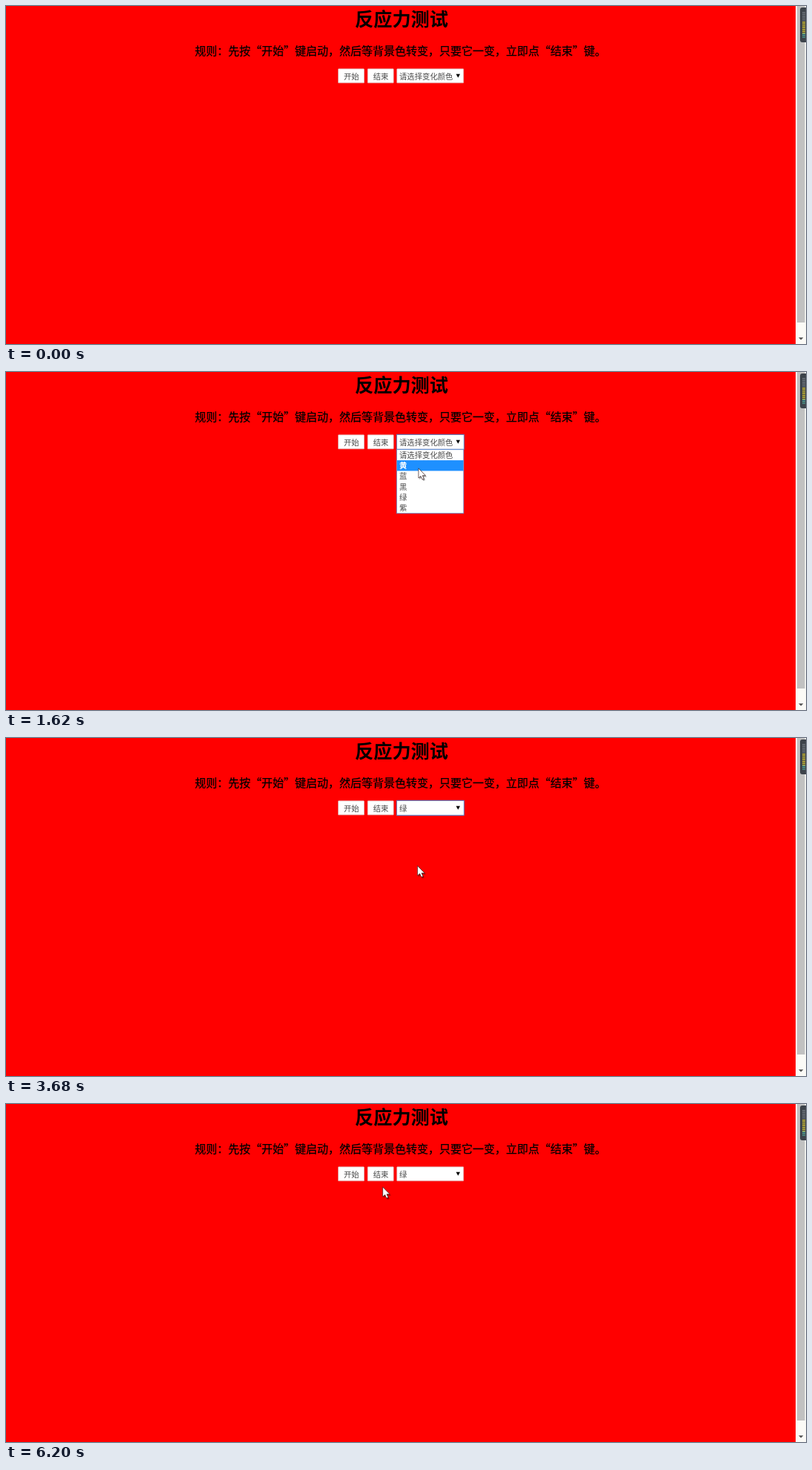
An HTML page that plays this animation: 1080x456 px, repeating every 8 s.

```html
<!DOCTYPE html>
<html lang="zh-CN">
<head>
<meta charset="utf-8">
<title>反应力测试</title>
<style>
  html, body { margin: 0; width: 100%; height: 100%; overflow: hidden; background: #f00; }
  svg { display: block; width: 100vw; height: 100vh; }
  text { font-family: "Noto Sans CJK SC", "Noto Sans CJK", sans-serif; white-space: pre; }
  .control rect { fill: #fff; stroke: #d8a8a8; stroke-width: .7; }
  .control.hover rect { stroke: #b89090; }
  .control.focus rect { x: 527.4px; y: 84.4px; width: 91px; height: 20px; stroke: #6678b8; stroke-width: 1.1; }
  .rule { font-size: 15px; font-weight: 500; stroke: #000; stroke-width: .25; }
  .small { font-size: 10.35px; fill: #484848; }
  .active { fill: #fff; font-weight: 700; }
</style>
</head>
<body>
<svg viewBox="0 0 1080 456" preserveAspectRatio="none">
  <rect width="1080" height="456" fill="#f00"/>
  <text x="471" y="27" font-size="25.2" font-weight="700">反应力测试</text>
  <text class="rule" x="255" y="66.3">规则：先按“开始”键启动，然后等背景色转变，只要它一变，立即点“结束”键。</text>

  <g class="control" id="start">
    <rect x="448.5" y="84.8" width="35" height="19" rx=".6"/>
    <text class="small" x="456" y="98.6">开始</text>
  </g>
  <g class="control" id="stop">
    <rect x="488.2" y="84.8" width="35" height="19" rx=".6"/>
    <text class="small" x="495.7" y="98.6">结束</text>
  </g>
  <g class="control" id="select">
    <rect x="527.7" y="84.8" width="90" height="19" rx=".6"/>
    <text class="small" id="value" x="531" y="98.6"></text>
    <path d="M607.6 91.8H613L610.3 96.8Z"/>
  </g>

  <g id="menu">
    <rect x="527.5" y="104.7" width="90.3" height="86" fill="#fff" stroke="#5b8fd8" stroke-width=".8"/>
    <rect id="mark" x="528" width="89.5" height="14.3" fill="#1e90ff"/>
    <g id="rows"></g>
  </g>

  <rect x="1066" width="14" height="456" fill="#fbfaf6"/>
  <rect x="1068" width="10.5" height="427" fill="#c1c1c1"/>
  <path d="M1070 447.3H1076.4L1073.2 450.5Z" fill="#505050"/>
  <rect x="1072" y="2" width="14" height="47" rx="3" fill="#3d434b"/>
  <g stroke-width="4" stroke-dasharray="1.4 1.1">
    <path d="M1077 8V20" stroke="#6c737b"/>
    <path d="M1077 21V37" stroke="#c6b52f"/>
    <path d="M1077 37V43" stroke="#4f9e91"/>
  </g>

  <g id="cursor">
    <path d="M1.6 1.5V15.6L4.7 12.8L6.9 17.4L9.4 16.3L7.3 11.9H11.6Z" opacity=".38"/>
    <path d="M.4 .4V13.6L3.4 10.9L5.5 15.6L7.8 14.6L5.8 10.2H9.9Z" fill="#fff" stroke="#3a2020" stroke-width=".7"/>
  </g>
</svg>
<script>
const LOOP = 8000, STEP = 60;
const OPEN = 1250, CHOOSE = 3680, BLUR = 4120;
const ROW_TOP = 104.8, ROW_HEIGHT = 14.3;
const options = ["请选择变化颜色", "黄", "蓝", "黑", "绿", "紫"];

// Each move starts where the previous one ended.
const entry = { x: 280, y: 13 };
const moves = [
  { start: 130, end: 490, x: 555, y: 97 },
  { start: 690, end: 810, x: 506, y: 64 },
  { start: 870, end: 1050, x: 549.5, y: 100.5 },
  { start: 1380, end: 1620, x: 556.5, y: 129.5 },
  { start: 1680, end: 2460, x: 555.2, y: 183 },
  { start: 2720, end: 3020, x: 555.2, y: 172 },
  { start: 3940, end: 4120, x: 472, y: 97 },
  { start: 4320, end: 4560, x: 512.5, y: 101 },
  { start: 5690, end: 5940, x: 508.2, y: 111.5 }
];

const $ = id => document.getElementById(id);
const lerp = (a, b, u) => a + (b - a) * u;
const show = (id, visible) => $(id).style.display = visible ? "" : "none";

$("rows").innerHTML = options.map((label, i) =>
  `<text class="small" x="531" y="${ROW_TOP + ROW_HEIGHT * i + 11}">${label}</text>`).join("");
const rows = [...$("rows").children];

function pointerAt(t) {
  const index = moves.findLastIndex(m => t >= m.start);
  if (index < 0) return null;
  const to = moves[index], from = moves[index - 1] ?? entry;
  const steps = Math.round((to.end - to.start) / STEP) + 1;
  const u = Math.min(1, (Math.floor((t - to.start) / STEP + 1e-6) + 1) / steps);
  return { x: lerp(from.x, to.x, u), y: lerp(from.y, to.y, u) };
}

function isOver(id, point) {
  if (!point) return false;
  const { x, y, width, height } = $(id).firstElementChild.getBBox();
  return point.x >= x && point.x <= x + width && point.y >= y && point.y <= y + height;
}

function render(t) {
  const point = pointerAt(t);
  show("cursor", point);
  if (point) $("cursor").setAttribute("transform", `translate(${point.x} ${point.y})`);

  for (const id of ["start", "stop", "select"])
    $(id).classList.toggle("hover", isOver(id, point));
  $("select").classList.toggle("focus", t >= OPEN && t < BLUR);
  $("value").textContent = options[t < CHOOSE ? 0 : 4];

  const open = t >= OPEN && t < CHOOSE;
  show("menu", open);
  if (!open) return;
  const active = Math.max(0, Math.floor((point.y - ROW_TOP) / ROW_HEIGHT));
  $("mark").setAttribute("y", ROW_TOP + active * ROW_HEIGHT);
  rows.forEach((row, i) => row.classList.toggle("active", i === active));
}

let began;
function tick(now) {
  began ??= now;
  render((now - began) % LOOP);
  requestAnimationFrame(tick);
}
render(0);
requestAnimationFrame(tick);
</script>
</body>
</html>
```
